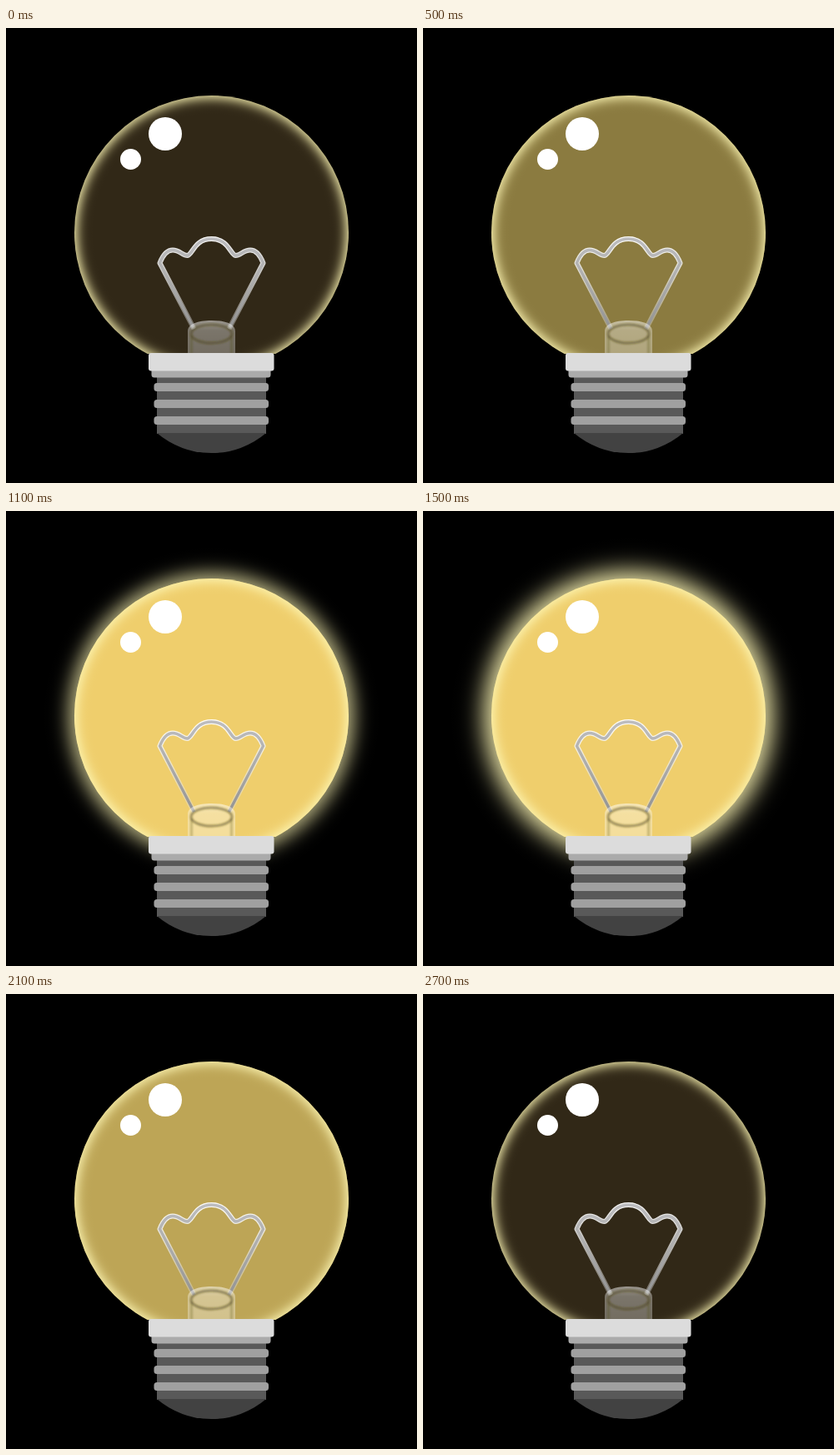
An HTML page for the animation above (2800 ms loop, 493 by 546 pixels).

```html
<!DOCTYPE html>
<html lang="en">
<head>
<meta charset="utf-8">
<title>Light bulb</title>
<style>
  html, body { margin: 0; width: 100%; height: 100%; overflow: hidden; background: #000; }
  svg { display: block; width: 100vw; height: 100vh; }
</style>
</head>
<body>
<svg viewBox="0 0 493 546">
  <defs>
    <radialGradient id="glowFill" gradientUnits="userSpaceOnUse" cx="246.5" cy="245.5" r="220"></radialGradient>
    <radialGradient id="rimFill" gradientUnits="userSpaceOnUse" cx="246.5" cy="245.5" r="164.5"></radialGradient>
    <linearGradient id="wireEdge" gradientUnits="userSpaceOnUse" x1="0" y1="250" x2="0" y2="360">
      <stop offset="0" stop-color="#fff" stop-opacity=".95"/>
      <stop offset=".3" stop-color="#f4f4f4" stop-opacity=".85"/>
      <stop offset="1" stop-color="#ddd" stop-opacity=".35"/>
    </linearGradient>
    <linearGradient id="wireCore" gradientUnits="userSpaceOnUse" x1="0" y1="250" x2="0" y2="360">
      <stop offset="0" stop-color="#bdbdc0"/>
      <stop offset=".4" stop-color="#b0b0b0"/>
      <stop offset="1" stop-color="#949494"/>
    </linearGradient>
    <linearGradient id="stemFill" x1="0" y1="0" x2="0" y2="1">
      <stop offset="0" stop-color="#fff" stop-opacity=".52"/>
      <stop offset=".3" stop-color="#fff" stop-opacity=".36"/>
      <stop offset="1" stop-color="#fff" stop-opacity=".32"/>
    </linearGradient>
    <filter id="soft" x="-20%" y="-40%" width="140%" height="180%">
      <feGaussianBlur stdDeviation=".8"/>
    </filter>
    <clipPath id="aboveCap"><path d="M0 0H493V391H0Z"/></clipPath>
  </defs>

  <circle id="glow" cx="246.5" cy="245.5" r="220" fill="url(#glowFill)"/>
  <g clip-path="url(#aboveCap)">
    <circle id="glass" cx="246.5" cy="245.5" r="164.5"/>
    <circle cx="246.5" cy="245.5" r="164.5" fill="url(#rimFill)"/>
  </g>

  <g fill="none" stroke-linejoin="round">
    <path id="wire" stroke="url(#wireEdge)" stroke-width="6"
      d="M225.500 361L184.500 282C188 273 193 266.500 200 266.500C208 266.500 212 273 217.500 273C224 272 226 253 246.500 253C267 253 269 272 275.500 273C281 273 285 266.500 293 266.500C300 266.500 305 273 308.500 282L267.500 361"/>
    <use href="#wire" id="core"/>
  </g>

  <path fill="url(#stemFill)" d="M218 391V364C218 355 230 351 246.500 351S275 355 275 364V391Z"/>
  <g fill="none" stroke="#4a4212" filter="url(#soft)">
    <path stroke-width="3" stroke-opacity=".26" d="M222.500 369V391M270.500 369V391"/>
    <ellipse cx="246.500" cy="367" rx="24.500" ry="11" stroke-width="3" stroke-opacity=".5"/>
  </g>

  <g fill="#fff">
    <circle cx="191" cy="127" r="20"/>
    <circle cx="149.500" cy="157.500" r="12.500"/>
  </g>

  <path fill="#595959" d="M181 415H312V487H181Z"/>
  <path fill="#424242" d="M181 486H312A101 101 0 0 1 181 486Z"/>
  <rect x="174.500" y="405" width="143" height="14.500" rx="3.500" fill="#ababab"/>
  <rect x="171" y="390" width="150.500" height="21.500" rx="3" fill="#dcdcdc"/>
  <g id="ribs" fill="#a0a0a0"></g>
</svg>
<script>
const NS = 'http://www.w3.org/2000/svg';
const LOOP = 2800, STEP = 100, RADIUS = 164.5, GLOW_R = 220;
const PALE = '#fdf6b4';
// Glass colours: off, dim, lit, lit with halo.
const COLORS = [[49, 40, 23], [139, 123, 64], [239, 206, 108], [239, 206, 108]];
// Time in ms and brightness level.
const KEYS = [[0, 0], [480, 1], [930, 2], [1200, 3], [1400, 3], [1900, 2], [2300, 1], [2700, 0], [2800, 0]];
const $ = id => document.getElementById(id);
const mix = (a, b, p) => a + (b - a) * p;
const ease = p => (1 - Math.cos(Math.PI * p)) / 2;
// Approximate share of a blurred edge that lies beyond z deviations.
const tail = z => 1 / (1 + Math.exp(1.5976 * z + 0.07056 * z ** 3));

function add(parent, tag, attrs) {
  const node = document.createElementNS(NS, tag);
  for (const key in attrs) node.setAttribute(key, attrs[key]);
  return parent.appendChild(node);
}

function addStops(id, count, from) {
  return Array.from({ length: count + 1 }, (_, i) =>
    add($(id), 'stop', { offset: from + (1 - from) * i / count, 'stop-color': PALE }));
}

for (const y of [426, 446, 466])
  add($('ribs'), 'rect', { x: 177.5, y, width: 137.5, height: 10, rx: 3.5 });

// The thin wire core reuses the wire path with its own stroke.
const core = $('wire').cloneNode();
core.id = 'core';
core.setAttribute('stroke', 'url(#wireCore)');
core.setAttribute('stroke-width', 3.4);
$('core').replaceWith(core);

const rimFrom = 1 - 24 / RADIUS;
addStops('rimFill', 16, rimFrom).forEach((stop, i) => {
  const depth = 24 * (1 - i / 16);
  stop.setAttribute('stop-opacity', i ? tail((depth - 3.4) / 6.5) : 0);
});

const glowFrom = RADIUS / GLOW_R;
const glowStops = addStops('glowFill', 24, glowFrom);

function setGlow(power) {
  $('glow').style.display = power > 0.001 ? '' : 'none';
  glowStops.forEach((stop, i) => {
    const dist = (GLOW_R - RADIUS) * i / 24;
    const z = (dist - 10 * power) / (15 * power + 0.01);
    stop.setAttribute('stop-opacity', i < 24 ? power * tail(Math.min(z, 8)) : 0);
  });
}

function levelAt(t) {
  const i = KEYS.findIndex(key => key[0] > t);
  const [t0, v0] = KEYS[i - 1], [t1, v1] = KEYS[i];
  return mix(v0, v1, ease((t - t0) / (t1 - t0)));
}

function draw(time) {
  const level = levelAt(Math.floor(time % LOOP / STEP) * STEP);
  const i = Math.min(2, Math.floor(level));
  const rgb = COLORS[i].map((c, k) => Math.round(mix(c, COLORS[i + 1][k], level - i)));
  $('glass').setAttribute('fill', `rgb(${rgb})`);
  setGlow(Math.max(0, level - 2));
}

const start = performance.now();
function tick() {
  draw(performance.now() - start);
  requestAnimationFrame(tick);
}
tick();
</script>
</body>
</html>
```
